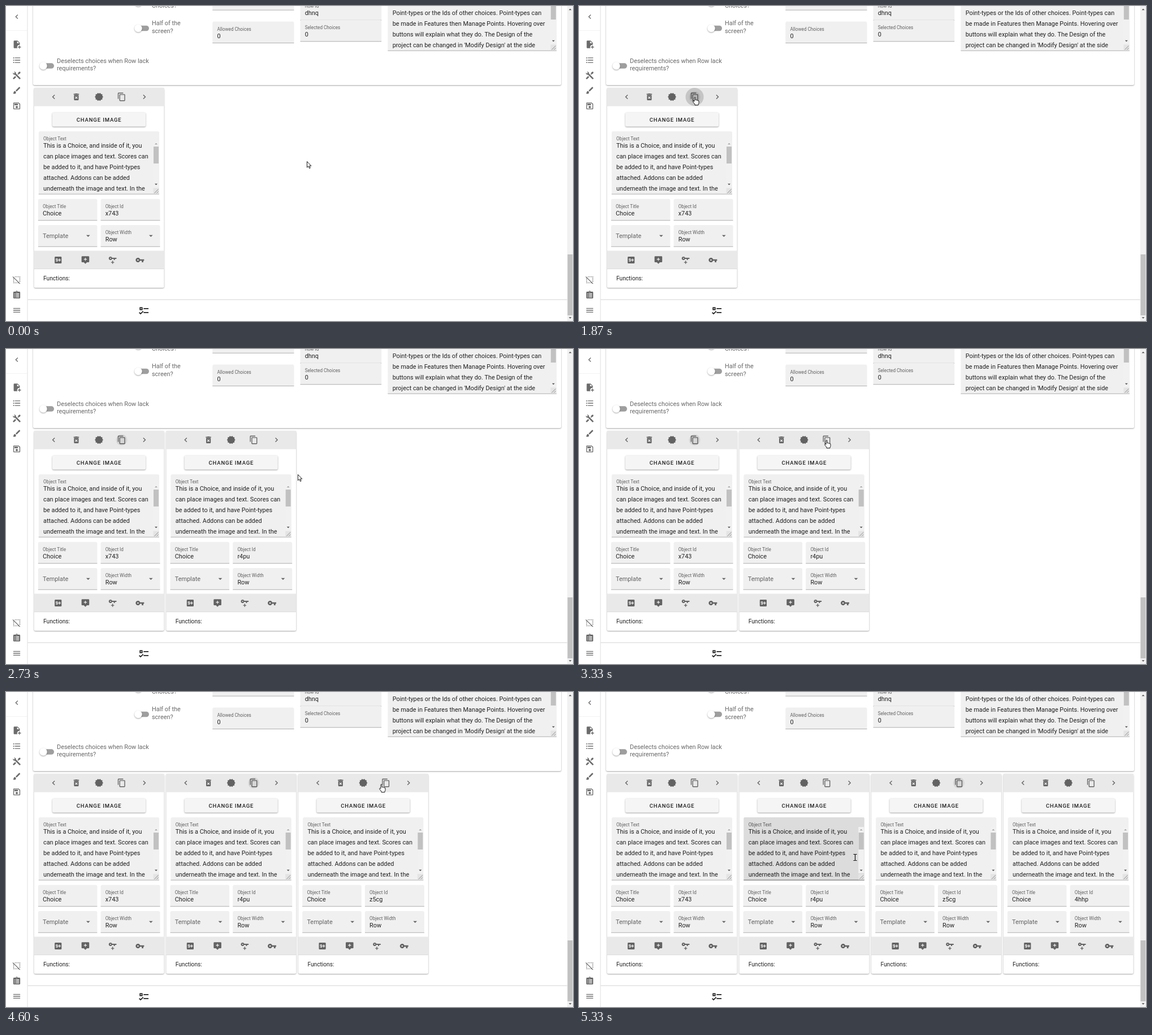
Animation of 1003x558 px, one loop 6070 ms. Source, as an HTML page:

```html
<!DOCTYPE html>
<html lang="en">
<head>
<meta charset="utf-8">
<title>Choice editor</title>
<style>
html, body { margin: 0; width: 100%; height: 100%; overflow: hidden; background: #fff; }
svg { display: block; width: 100vw; height: 100vh; font: 10.88px Roboto, sans-serif; fill: rgba(0,0,0,.87); }
.icon { fill: rgba(0,0,0,.58); }
.label { font-size: 8.16px; fill: rgba(0,0,0,.6); }
.muted { fill: rgba(0,0,0,.6); }
.button { font-size: 9.52px; font-weight: 500; letter-spacing: .0893em; }
.panel { font-size: 10.2px; }
.raised { filter: drop-shadow(0 1px 1px rgba(0,0,0,.36)); }
.pointer { fill: #fff; stroke: #000; stroke-width: .9; stroke-linejoin: round; }
</style>
</head>
<body>
<svg id="stage" viewBox="0 0 1003 558"></svg>
<script>
const ICONS = {
  left: 'M15.41 16.58L10.83 12l4.58-4.59L14 6l-6 6 6 6z',
  right: 'M8.59 16.58L13.17 12 8.59 7.41 10 6l6 6-6 6z',
  trash: 'M6 19a2 2 0 0 0 2 2h8a2 2 0 0 0 2-2V7H6zM8.46 11.88l1.41-1.41L12 12.59l2.12-2.12 1.41 1.41L13.41 14l2.12 2.12-1.41 1.41L12 15.41l-2.12 2.12-1.41-1.41L10.59 14zM15.5 4l-1-1h-5l-1 1H5v2h14V4z',
  badge: 'M23 12l-2.44-2.78.34-3.68-3.61-.82-1.89-3.18L12 3 8.6 1.54 6.71 4.72l-3.61.81.34 3.68L1 12l2.44 2.78-.34 3.69 3.61.82 1.89 3.18L12 21l3.4 1.46 1.89-3.18 3.61-.82-.34-3.68z',
  copy: 'M19 21H8V7h11zm0-16H8a2 2 0 0 0-2 2v14a2 2 0 0 0 2 2h11a2 2 0 0 0 2-2V7a2 2 0 0 0-2-2zM16 1H4a2 2 0 0 0-2 2v14h2V3h12z',
  score: 'M5 3h14a2 2 0 0 1 2 2v14a2 2 0 0 1-2 2H5a2 2 0 0 1-2-2V5a2 2 0 0 1 2-2zM7 8a1 1 0 0 0-1 1v3a1 1 0 0 0 1 1h2v1.5H6V16h4a1 1 0 0 0 1-1V9a1 1 0 0 0-1-1zm.7 1.5h1.6v2H7.7zM14.5 8.5V11H12v2h2.5v2.5h2V13H19v-2h-2.5V8.500z',
  addon: 'M4 2h16a2 2 0 0 1 2 2v12a2 2 0 0 1-2 2h-4l-4 4-4-4H4a2 2 0 0 1-2-2V4a2 2 0 0 1 2-2zm7 4v3H8v2h3v3h2v-3h3V9h-3V6z',
  keyPlus: 'M6.5 3c1.96 0 3.63 1.25 4.24 3H22v3h-4v3h-3V9h-4.26A4.5 4.5 0 1 1 6.5 3zm0 3a1.5 1.5 0 1 0 0 3 1.5 1.5 0 0 0 0-3zM8 17h3v-3h2v3h3v2h-3v3h-2v-3H8z',
  key: 'M12.65 10A6 6 0 1 0 12.65 14H17v4h4v-4h2v-4zM7 14a2 2 0 1 1 0-4 2 2 0 0 1 0 4z',
  down: 'M7 10l5 5 5-5z',
  filePlus: 'M14 2H6a2 2 0 0 0-2 2v16a2 2 0 0 0 2 2h7.81A6 6 0 0 1 20 13.08V8zM13 9V3.5L18.500 9zM23 20h-3v3h-2v-3h-3v-2h3v-3h2v3h3z',
  list: 'M7 5h14v2H7zm0 6h14v2H7zm0 6h14v2H7zM4 4.500a1.5 1.5 0 1 1 0 3 1.5 1.5 0 0 1 0-3zm0 6a1.5 1.5 0 1 1 0 3 1.5 1.5 0 0 1 0-3zm0 6a1.5 1.5 0 1 1 0 3 1.5 1.5 0 0 1 0-3z',
  tools: 'M21.71 20.29l-1.42 1.42a1 1 0 0 1-1.41 0L7 9.85A4 4 0 0 1 2.22 4.7l2.54 2.54 2.48-2.48L4.7 2.22A4 4 0 0 1 9.85 7l11.86 11.88a1 1 0 0 1 0 1.41zM2.29 18.88a1 1 0 0 0 0 1.41l1.42 1.42a1 1 0 0 0 1.41 0l5.47-5.46-2.83-2.83zM20 2l-4 2v2l-2.17 2.17 2 2L18 8h2l2-4z',
  brush: 'M20.71 4.630l-1.34-1.34a1 1 0 0 0-1.41 0L9 12.25 11.75 15l8.96-8.96a1 1 0 0 0 0-1.41zM7 14a3 3 0 0 0-3 3c0 1.310-1.160 2-2 2 .92 1.220 2.500 2 4 2a4 4 0 0 0 4-4 3 3 0 0 0-3-3z',
  save: 'M17 3H5a2 2 0 0 0-2 2v14a2 2 0 0 0 2 2h14a2 2 0 0 0 2-2V7zm2 16H5V5h11.17L19 7.830zM12 12a3 3 0 1 0 0 6 3 3 0 0 0 0-6zM6 6h9v4H6z',
  selectOff: 'M1 4.27L2.28 3 21 21.72 19.73 23 17 20.27V21h-2v-2h.73L5 8.270V9H3V7h.73zM19 3h2v2h-2zM15 3h2v2h-2zM11 3h2v2h-2zM7 3h2v2H7zM11 19h2v2h-2zM7 19h2v2H7zM3 19h2v2H3zM3 15h2v2H3zM19 15h2v2h-2zM3 11h2v2H3zM19 11h2v2h-2zM19 7h2v2h-2z',
  clipboard: 'M19 3h-4.180a3 3 0 0 0-5.640 0H5a2 2 0 0 0-2 2v14a2 2 0 0 0 2 2h14a2 2 0 0 0 2-2V5a2 2 0 0 0-2-2zm-7 0a1 1 0 1 1 0 2 1 1 0 0 1 0-2zM6 8h2v2H6zM10 8h8v2h-8zM6 12h2v2H6zM10 12h8v2h-8zM6 16h2v2H6zM10 16h8v2h-8z',
  menu: 'M3 6h18v2H3zm0 5h18v2H3zm0 5h18v2H3z',
  checklist: 'M3 5h6v6H3zM5 7v2h2V7zM11 7h10v2H11zM11 15h10v2H11zM5 20l-3.500-3.500 1.410-1.410L5 17.170l4.590-4.580L11 14z'
};
const STEP = 233.7, LOOP = 6070, TICK = 1000 / 15;
const stage = document.getElementById('stage');

const rect = (x, y, w, h, fill, extra = '') =>
  `<rect x="${x}" y="${y}" width="${w}" height="${h}" fill="${fill}" ${extra}/>`;
const text = (x, y, str, cls = '') => `<text x="${x}" y="${y}" class="${cls}">${str}</text>`;
const lines = (x, y, gap, rows, cls) => rows.map((row, i) => text(x, y + i * gap, row, cls)).join('');
const icon = (name, x, y, size = 16.3, cls = 'icon') =>
  `<path class="${cls}" fill-rule="evenodd" d="${ICONS[name]}" transform="translate(${x - size / 2} ${y - size / 2}) scale(${size / 24})"/>`;
const triangle = (x, y, dir, fill) => `<path d="M${x - 2.5} ${y + dir * 1.3}h5l-2.5 ${-dir * 2.6}z" fill="${fill}"/>`;

function box(x, y, w, h) {
  return `<path d="M${x} ${y + h}v${3 - h}q0-3 3-3h${w - 6}q3 0 3 3v${h - 3}z" fill="#f0f0f0"/>` +
    rect(x, y + h - .7, w, .7, '#949494');
}
function field(x, y, w, label, value) {
  return box(x, y, w, 38.5) + text(x + 8.2, y + 16, label, 'label') + text(x + 8.2, y + 29, value);
}
function scroller(x, top, bottom, thumbTop, thumbBottom) {
  const gripY = bottom + 1.5;
  return rect(x, top, 10, bottom - top, '#f1f1f1') +
    rect(x + .5, thumbTop, 9, thumbBottom - thumbTop, '#c1c1c1') +
    triangle(x + 5, top + 5, 1, '#a3a3a3') + triangle(x + 5, bottom - 5, -1, '#505050') +
    rect(x, gripY, 10, 10, '#e4e4e4') +
    `<path d="M${x + 2} ${gripY + 9}l7-7M${x + 6} ${gripY + 9}l3-3" stroke="#777" stroke-width=".8"/>`;
}
function toggle(x, y) {
  return rect(x - 5, y - 4.7, 24, 9.5, '#9e9e9e', 'rx="4.75"') +
    `<circle class="raised" cx="${x}" cy="${y}" r="6.7" fill="#fff"/>`;
}
function card(id, i) {
  const header = ['left', 'trash', 'badge', 'copy', 'right'].map((n, k) => icon(n, 84.3 + k * 40.1, 161)).join('');
  const footer = ['score', 'addon', 'keyPlus', 'key'].map((n, k) => icon(n, 92.2 + k * 48.2, 450)).join('');
  return `<g class="card" transform="translate(${i * STEP})">
    <g class="raised">${rect(49.7, 145, 229.8, 354, '#fff', 'rx="2.5"')}</g>
    ${rect(49.7, 145, 229.8, 32.5, '#e9e9e9')}${rect(49.7, 433.5, 229.8, 31.5, '#e9e9e9')}
    ${rect(49.7, 465, 229.8, 1.2, '#dedede')}
    <circle class="focus" cx="204.5" cy="161" r="10"/><circle class="ripple" cx="204.5" cy="161"/>
    ${header}
    <g class="raised">${rect(82, 188.5, 165, 25, '#f5f5f5', 'rx="2.5"')}</g>${text(124.8, 204.5, 'CHANGE IMAGE', 'button')}
    ${box(57.7, 222, 213.3, 111.5)}
    <g class="hover">${rect(57.7, 222, 213.3, 111.500, '#dcdcdc', 'rx="2"')}${rect(57.7, 332.7, 213.3, .8, '#555')}</g>
    ${text(66, 238, 'Object Text', 'label')}
    ${lines(66, 251, 19, ['This is a Choice, and inside of it, you', 'can place images and text. Scores can',
      'be added to it, and have Point-types', 'attached. Addons can be added', 'underneath the image and text. In the'])}
    ${scroller(260.5, 239, 321, 249, 279)}
    ${field(56.8, 341.7, 104.6, 'Object Title', 'Choice')}${field(167.5, 341.7, 105, 'Object Id', id)}
    ${box(56.8, 388, 104.6, 38.5)}${text(65, 410.5, 'Template', 'muted')}${icon('down', 145.3, 407)}
    ${field(167.5, 388, 105, 'Object Width', 'Row')}${icon('down', 256.3, 407)}
    ${footer}${text(66, 485.8, 'Functions:', 'panel')}
  </g>`;
}

const sidebar = Object.entries({ left: 19, filePlus: 68, list: 96, tools: 123, brush: 149.5, save: 177,
  selectOff: 485, clipboard: 512, menu: 539 }).map(([name, y]) => icon(name, 19, y)).join('');

stage.innerHTML = `
  ${rect(0, 0, 1003, 558, '#fff')}
  <g class="raised">${rect(48, -10, 934, 150, '#fff', 'rx="2.5"')}</g>
  ${toggle(234, -6)}${text(258, 3, 'Choices?', 'muted')}
  ${toggle(234, 39.5)}${lines(258, 34, 13.7, ['Half of the', 'screen?'], 'muted')}
  ${toggle(66, 106)}${lines(90, 100.5, 13.6, ['Deselects choices when Row lack', 'requirements?'], 'muted')}
  ${box(365.3, -31, 144.2, 38.5)}${field(365.3, 27.5, 144.2, 'Allowed Choices', '0')}
  ${field(520.5, -13, 143.7, 'Row Id', 'dhnq')}${field(520.5, 24.7, 143.7, 'Selected Choices', '0')}
  ${box(675.3, -32, 298.7, 111.5)}
  ${lines(683.7, 16, 19, ['Point-types or the Ids of other choices. Point-types can', 'be made in Features then Manage Points. Hovering over',
    'buttons will explain what they do. The Design of the', "project can be changed in 'Modify Design' at the side"])}
  ${scroller(963.3, -15, 67, -6, 24)}
  ${['x743', 'r4pu', 'z5cg', '4hhp'].map(card).join('')}
  ${rect(38, 519.5, 955, 1.5, '#e2e2e2')}${icon('checklist', 244.2, 539.5, 21, '')}
  ${rect(37.5, 0, 1, 558, '#e0e0e0')}${rect(0, 43, 37.5, .7, '#ececec')}${sidebar}
  ${rect(992.7, 0, 10.3, 558, '#f1f1f1')}${rect(993.4, 440, 8.8, 108, '#c1c1c1')}
  ${triangle(998, 6, 1, '#505050')}${triangle(998, 552.5, -1, '#505050')}
  <g id="cursor">
    <path class="pointer" d="M.5 .5v10.500l2.400-2.200 1.700 3.800 1.700-.700-1.700-3.700h3.300z"/>
    <path d="M-3-5.500h2l1 .6 1-.6h2M0-5v10M-3 5.500h2l1-.6 1 .6h2" fill="none" stroke="#000" stroke-width="1.1"/>
    <path class="pointer" d="M-1 8V1.500Q-1 .5 0 .5T1 1.500V5.500Q2.500 4.700 3 6 4.500 5.300 5 6.600 7 6 7 8V10.500Q7 12 6 13V14.500H0V13L-3.300 8.900Q-3.500 7.300-2.300 7.300z"/>
  </g>`;

const cards = [...document.querySelectorAll('.card')].map((el, i) => ({
  el, shown: [0, 1933, 3533, 5000][i],
  focus: el.querySelector('.focus'), ripple: el.querySelector('.ripple'), hover: el.querySelector('.hover')
}));
const cursor = document.getElementById('cursor');

// Press and release of each copy button; the last card is never pressed.
const clicks = [[1660, 1933], [3393, 3533], [4860, 5000]];
// Card index, then when the pointer enters and leaves its text area.
const hovers = [[1, 2267, 2467], [2, 3600, 3800], [2, 4200, 4350], [1, 5130, 9999]];
const path = [[0, 532, 275], [66, 531, 274], [533, 531, 274], [667, 470, 266], [933, 260, 227], [1133, 209, 174],
  [1220, 209, 174], [1333, 205, 161], [2000, 205, 161], [2133, 260, 178], [2333, 440, 250], [2533, 582, 275],
  [2667, 564, 263], [2733, 516, 222], [2867, 462, 184], [3067, 443, 166], [3333, 438, 161], [3533, 438, 161],
  [3667, 560, 255], [3733, 540, 278], [3800, 518, 284], [4133, 518, 284], [4267, 560, 250], [4400, 620, 195],
  [4600, 664, 163], [4800, 670, 161], [5000, 670, 161], [5133, 600, 235], [5267, 500, 290], [5333, 488.5, 293]];

const clamp = v => Math.max(0, Math.min(1, v));

function position(t) {
  const k = path.findIndex(p => p[0] > t);
  if (k < 0) return path[path.length - 1].slice(1);
  const [t0, x0, y0] = path[k - 1], [t1, x1, y1] = path[k];
  const u = (t - t0) / (t1 - t0);
  return [x0 + (x1 - x0) * u, y0 + (y1 - y0) * u];
}

function cursorKind(x, y, t) {
  const i = Math.floor((x - 49.7) / STEP);
  if (!cards[i] || t < cards[i].shown) return 0;
  const cx = x - i * STEP;
  if (cx > 57.7 && cx < 261 && y > 222 && y < 333) return 1;
  const onButton = cx > 82 && cx < 247 && y > 188 && y < 214;
  return onButton || Math.hypot(cx - 204.5, y - 161) < 17 ? 2 : 0;
}

function draw(now) {
  const t = Math.floor((now % LOOP + 4) / TICK) * TICK;
  const [x, y] = position(t);
  const kind = cursorKind(x, y, t);
  cursor.setAttribute('transform', `translate(${x} ${y})`);
  [...cursor.children].forEach((el, i) => el.style.display = i === kind ? '' : 'none');

  cards.forEach((c, i) => {
    c.el.style.display = t >= c.shown - 1 ? '' : 'none';
    const [press, release] = clicks[i] || [Infinity, Infinity];
    const nextPress = clicks[i + 1] ? clicks[i + 1][0] : Infinity;
    c.focus.style.opacity = t >= press && t < nextPress ? .09 : 0;
    c.ripple.setAttribute('r', 6 + 10 * clamp((t - press) / 150));
    c.ripple.style.opacity = t < press ? 0 : .18 * (1 - clamp((t - release) / 270));
    c.hover.style.opacity = Math.max(0, ...hovers.filter(h => h[0] === i)
      .map(([, start, end]) => clamp((t - start) / 130) * (1 - clamp((t - end) / 130))));
  });
}

const start = performance.now();
function frame() {
  draw(performance.now() - start);
  requestAnimationFrame(frame);
}
frame();
</script>
</body>
</html>
```
